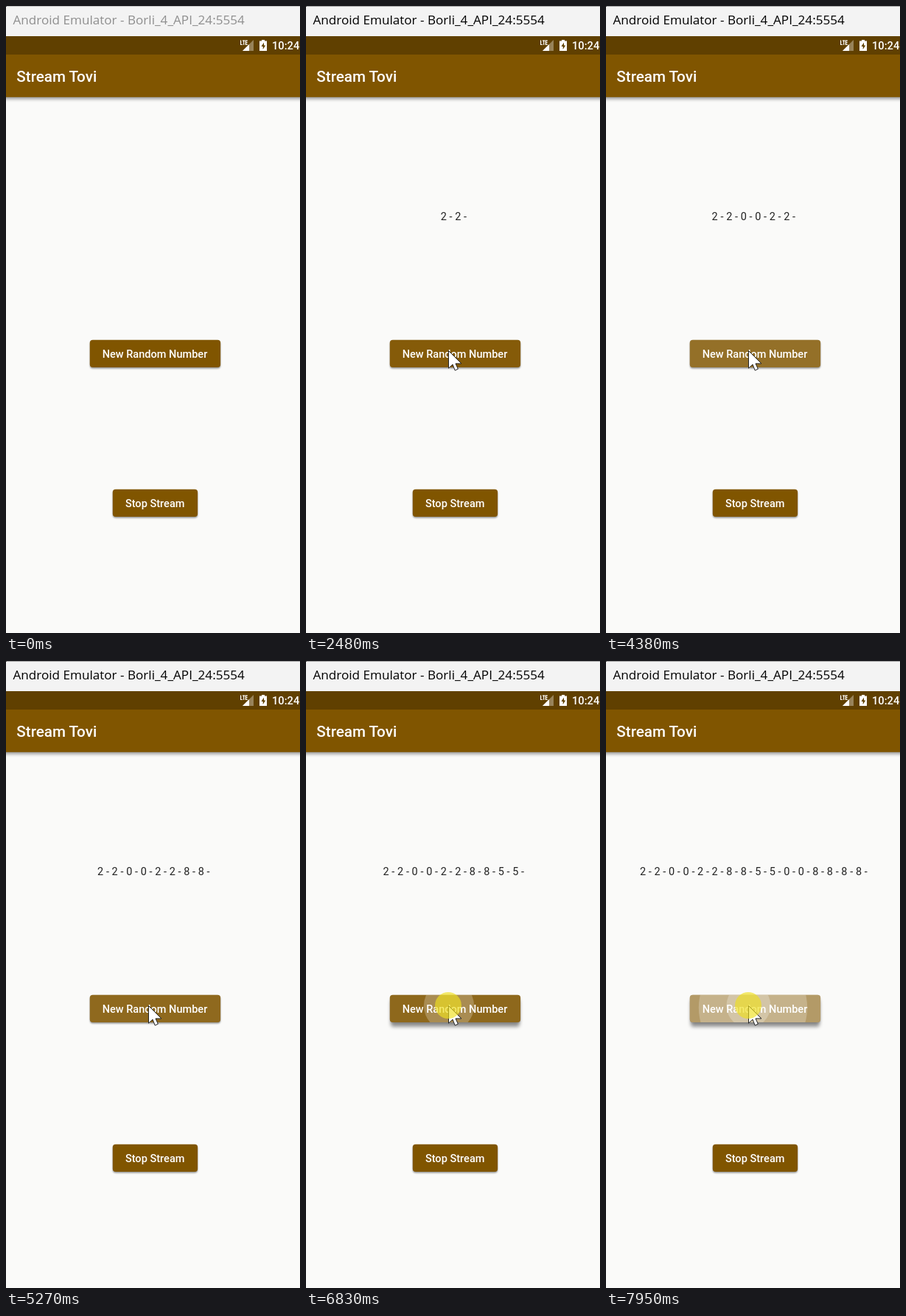
These frames come from a looping animation (399 by 852 pixels, 8 s). An HTML page:

```html
<!DOCTYPE html>
<html lang="en">
<head>
<meta charset="utf-8">
<title>Random number stream</title>
<style>
  html, body { margin: 0; width: 100%; height: 100%; overflow: hidden; background: #fafafa; }
  svg { display: block; width: 100vw; height: 100vh; }
  text { font-family: Roboto, sans-serif; white-space: pre; }
  .label { font-size: 14.55px; font-weight: 500; fill: #fff; text-anchor: middle; }
  #caption { font: 17.1px "Open Sans", sans-serif; }
  #numbers { font-size: 14.46px; letter-spacing: .06px; fill: #222; text-anchor: middle; }
</style>
</head>
<body>
<svg viewBox="0 0 399 852" preserveAspectRatio="none">
  <defs>
    <filter id="soft" x="-20%" y="-60%" width="140%" height="220%"><feGaussianBlur stdDeviation="1.2"/></filter>
    <filter id="wide" x="-20%" y="-60%" width="140%" height="220%"><feGaussianBlur stdDeviation="2.8"/></filter>
    <clipPath id="face"><rect x="113.8" y="453.8" width="177.3" height="37.2" rx="4"/></clipPath>
  </defs>

  <rect width="399" height="852" fill="#fafaf9"/>
  <rect x="-10" y="70" width="419" height="56" filter="url(#wide)" opacity=".45"/>
  <rect y="66" width="399" height="57.8" fill="#805500"/>
  <rect y="41" width="399" height="25" fill="#604000"/>
  <rect width="399" height="41" fill="#f3f3f3"/>
  <rect id="edge" width="399" height="1"/>
  <rect width="1" height="1" fill="#444"/>

  <text id="caption" x="9.5" y="25">Android Emulator - Borli_4_API_24:5554</text>
  <text x="14.3" y="103" font-size="20.7" font-weight="500" fill="#fff">Stream Tovi</text>

  <g fill="#fff">
    <path d="M336 46V61H321Z" opacity=".35"/>
    <path d="M330 52V61H321Z"/>
    <path d="M318.600 46.500v6h2.400M321 47.100h3.400M322.700 47v6M327.800 47.100h-2.400v5.300h2.400M325.400 49.700h2.200" fill="none" stroke="#fff" stroke-width="1.2"/>
    <path d="M347 46h4v1.500h3V61h-10V47.500h3z"/>
    <path d="M350 49.500l-3.500 5.500h2.200v4l3.500-5.500h-2.200z" fill="#604000"/>
    <text x="361" y="59" font-size="14.700" font-weight="500">10:24</text>
  </g>

  <text id="numbers" x="202.2" y="291"></text>

  <rect id="lift" x="115" y="460" width="175" height="37" rx="4" filter="url(#wide)"/>
  <rect id="rest" x="114" y="455.500" width="177" height="37" rx="4" filter="url(#soft)"/>
  <rect x="113.8" y="453.8" width="177.3" height="37.2" rx="4" fill="#805500"/>
  <g clip-path="url(#face)" fill="#fff">
    <rect id="hover" x="113" y="453" width="179" height="39"/>
    <rect id="press" x="113" y="453" width="179" height="39"/>
    <g id="ripples"></g>
  </g>
  <text class="label" x="202" y="478">New Random Number</text>

  <rect x="145" y="658.500" width="115" height="37" rx="4" filter="url(#soft)" opacity=".45"/>
  <rect x="144.800" y="656.800" width="115.300" height="37.200" rx="4" fill="#805500"/>
  <text class="label" x="202.2" y="681">Stop Stream</text>

  <path id="cursor" d="M.5 .5V24.200L6 19 9.200 27.200 13.400 25.200 10 17.900H18Z" fill="#fff" stroke="#222"/>
  <circle id="spot" cx="193" cy="468" r="18" fill="#f0e11e" opacity=".65"/>
</svg>

<script>
  const LOOP = 8000, FOCUS = 1800, FIRST_NUMBERS = 2480;
  const VALUES = [...'2200228855008888'];
  const HOLD = [4930, 5130];
  // Press and release times of the button
  const CLICKS = [
    [2950, 3140], [3840, 4055], [4720, 4917], [5800, 6050],
    [6780, 7060], [7600, 7720], [7740, 7878], [7945, 8100]
  ].map(([down, up]) => ({ down, up }));
  // Cursor tip: time, x, y
  const PATH = [[570, 366, 838], [1330, 194, 477], [1400, 194, 474], [1470, 193, 468]];
  const LEAD = 55, R_START = 27, R_END = 95.4;

  const $ = id => document.getElementById(id);
  const clamp = v => Math.min(1, Math.max(0, v));
  const mix = (a, b, k) => a + (b - a) * k;
  const set = (el, attrs) => { for (const k in attrs) el.setAttribute(k, attrs[k]); };

  // Cubic Bezier (.25, .1, .25, 1)
  function ease(x) {
    x = clamp(x);
    let lo = 0, hi = 1, s = .5;
    for (let i = 0; i < 18; i++) {
      s = (lo + hi) / 2;
      const at = .75 * s * (1 - s) + s ** 3;
      if (at < x) lo = s; else hi = s;
    }
    return .3 * s * (1 - s) ** 2 + 3 * s * s * (1 - s) + s ** 3;
  }

  for (const click of CLICKS) {
    click.ring = document.createElementNS('http://www.w3.org/2000/svg', 'circle');
    $('ripples').append(click.ring);
  }

  function drawRipple({ down, up, ring }, t) {
    const grown = ease((Math.min(t, up) - down + LEAD) / 1000);
    const spread = t > up ? mix(grown, 1, ease((t - up) / 225)) : grown;
    const shown = t >= down ? 1 - clamp((t - up - 225) / 150) : 0;
    set(ring, {
      cx: mix(193, 202.5, spread), cy: mix(468, 472.5, spread),
      r: mix(R_START, R_END, spread), opacity: .24 * shown
    });
  }

  // Rises after the press, falls over 200 ms after the release
  function pressure(t, delay, rise) {
    return Math.max(...CLICKS.map(({ down, up }) => t < down ? 0 :
      clamp((Math.min(t, up) - down - delay) / rise) * (1 - clamp((t - up) / 200))));
  }

  function drawCursor(t) {
    let i = 0;
    while (i < PATH.length - 2 && t >= PATH[i + 1][0]) i++;
    const [t0, x0, y0] = PATH[i], [t1, x1, y1] = PATH[i + 1];
    const p = clamp((t - t0) / (t1 - t0));
    const k = i ? p : 1 - (1 - p) ** 2;
    set($('cursor'), {
      transform: `translate(${mix(x0, x1, k)} ${mix(y0, y1, k)})`,
      visibility: t < PATH[0][0] ? 'hidden' : 'visible'
    });
  }

  function draw(now) {
    const t = now % LOOP;
    const appTime = t > HOLD[0] && t < HOLD[1] ? HOLD[0] : t;
    const focused = t >= FOCUS;

    set($('caption'), { fill: focused ? '#000' : '#8f8f8f' });
    set($('edge'), { fill: focused ? '#a5a5a5' : '#c4c4c4' });
    drawCursor(t);

    const pairs = t < FIRST_NUMBERS ? 0 :
      1 + CLICKS.filter(c => appTime >= c.up + 20).length;
    const line = VALUES.slice(0, pairs * 2).map(v => v + ' - ').join('');
    if ($('numbers').textContent !== line) $('numbers').textContent = line;

    const lift = pressure(appTime, -LEAD, LEAD);
    set($('hover'), { opacity: .085 * clamp((t - 2450) / 75) });
    set($('press'), { opacity: .24 * pressure(appTime, 40, 100) });
    set($('lift'), { opacity: .42 * lift });
    set($('rest'), { opacity: mix(.45, .1, lift) });
    CLICKS.forEach(c => drawRipple(c, appTime));

    const touching = (t >= FOCUS && t < 2000) || CLICKS.some(c => t >= c.down && t < c.up);
    set($('spot'), { visibility: touching ? 'visible' : 'hidden' });
  }

  const start = performance.now();
  (function tick() {
    draw(performance.now() - start);
    requestAnimationFrame(tick);
  })();
</script>
</body>
</html>
```
